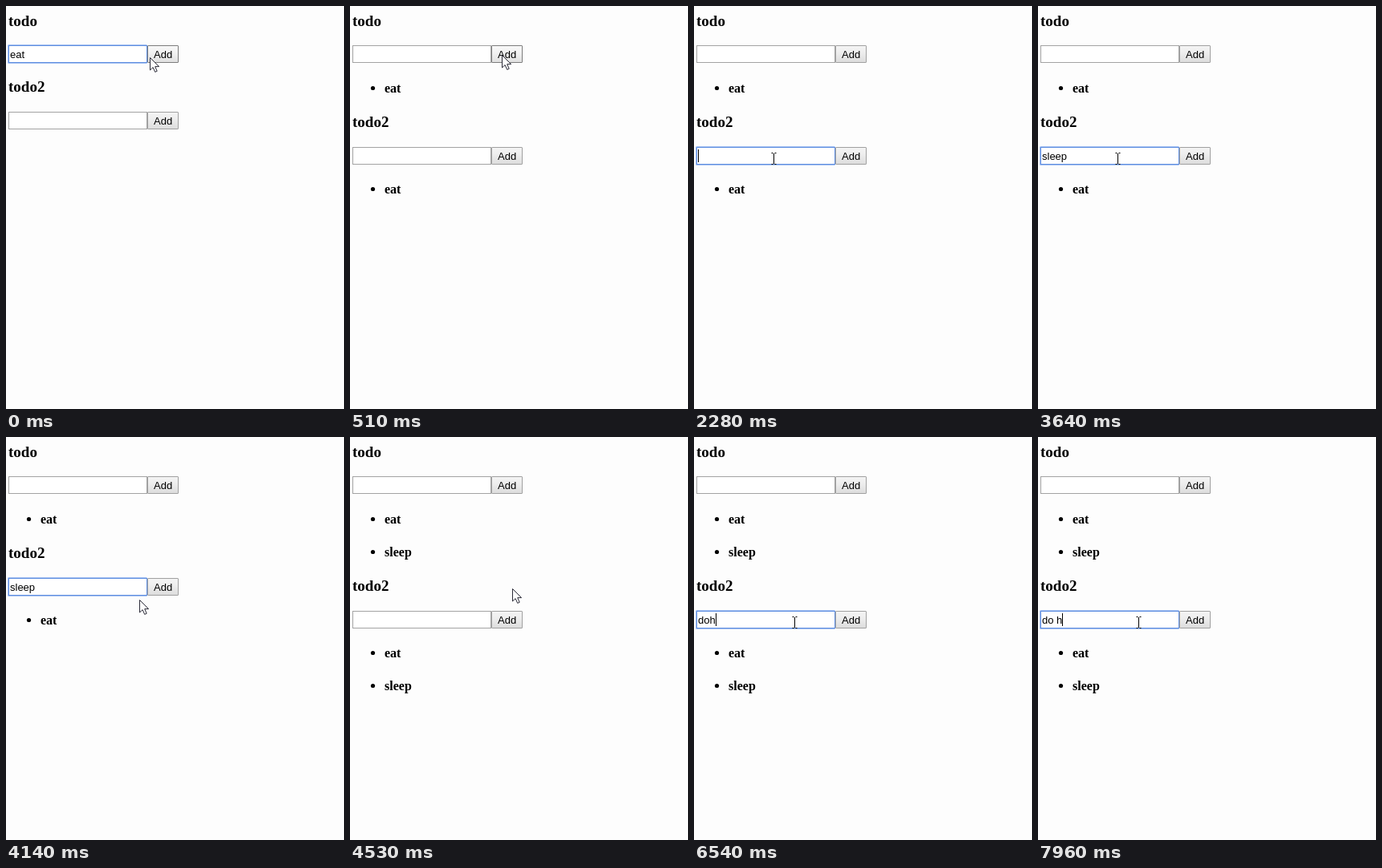
An HTML page for the animation above (8000 ms loop, 421 by 503 pixels).

```html
<!DOCTYPE html>
<html lang="en">
<head>
<meta charset="utf-8">
<title>Todo lists</title>
<style>
  html, body { margin: 0; width: 100%; height: 100%; overflow: hidden; background: #fdfdfd; }
  svg { display: block; width: 421px; height: 503px; }
  text { white-space: pre; }
  .head { font: bold 19px "Liberation Serif", serif; }
  .item { font: bold 16px "Liberation Serif", serif; }
  .ui { font: 13px "Liberation Sans", sans-serif; }
</style>
</head>
<body>
<svg id="stage" viewBox="0 0 421 503">
  <defs>
    <linearGradient id="idle" x2="0" y2="1">
      <stop offset="0" stop-color="#f4f4f4"/><stop offset=".4" stop-color="#eeeeee"/><stop offset="1" stop-color="#dcdcdc"/>
    </linearGradient>
    <linearGradient id="hover" x2="0" y2="1">
      <stop offset="0" stop-color="#f8f8f8"/><stop offset=".4" stop-color="#f2f2f2"/><stop offset="1" stop-color="#e0e0e0"/>
    </linearGradient>
    <linearGradient id="pressed" x2="0" y2="1">
      <stop offset="0" stop-color="#dddddd"/><stop offset="1" stop-color="#efefef"/>
    </linearGradient>
  </defs>
</svg>
<script>
const LOOP = 8000, ITEM_STEP = 41;
const stage = document.getElementById('stage');

function add(parent, tag, attrs, content = '') {
  const node = document.createElementNS('http://www.w3.org/2000/svg', tag);
  set(node, attrs);
  node.textContent = content;
  parent.appendChild(node);
  return node;
}
function set(node, attrs) {
  for (const key in attrs) node.setAttribute(key, attrs[key]);
}
const show = (node, on) => set(node, { visibility: on ? 'visible' : 'hidden' });
const move = (node, x, y) => set(node, { transform: `translate(${x} ${y})` });

// Each track holds [start time, value]; the latest started value applies.
const at = (track, t) => track.filter(step => step[0] <= t).pop()[1];

const itemCount = [[0, 0], [510, 1], [4530, 2]];
const focus = [[0, 0], [330, -1], [1180, 1], [4380, -1], [5680, 1]];
const mouseDown = [[0, false], [330, true], [510, false], [4380, true], [4530, false]];
const caretOn = [[0, false], [1180, true], [1720, false], [2280, true], [3640, false],
  [4180, true], [4380, false], [5680, true]];
const typed = [
  [[0, 'eat'], [510, '']],
  [[0, ''], [2400, 's'], [2590, 'sl'], [2770, 'sle'], [2960, 'slee'], [3080, 'sleep'], [4530, ''],
   [6110, 'd'], [6420, 'do'], [6540, 'doh'], [6920, 'do'], [7100, 'do '], [7280, 'do w'],
   [7710, 'do '], [7960, 'do h']]
];

// Pointer moves: start, end, number of steps, then start, control and end points.
const moves = [
  [45, 330, 3, [179, 64], [184, 63], [189, 61]],
  [570, 920, 6, [189, 61], [150, 120], [99, 190]],
  [3786, 4380, 8, [99, 190], [182, 216], [202, 189]],
  [4972, 5320, 6, [202, 189], [165, 205], [125, 234]],
  [5450, 5620, 3, [125, 234], [125, 232], [125, 231]]
];

function pointerAt(t) {
  let active = moves[0];
  for (const m of moves) if (t >= m[0]) active = m;
  const [start, end, steps, a, b, c] = active;
  const raw = Math.min(1, Math.max(0, (t - start) / (end - start)));
  const u = Math.floor(raw * steps + 1e-6) / steps;
  const k = u * u * (3 - 2 * u);
  return [0, 1].map(i =>
    Math.round((1 - k) ** 2 * a[i] + 2 * k * (1 - k) * b[i] + k * k * c[i]));
}

function makeList(title) {
  const heading = add(stage, 'text', { x: 3, class: 'head' }, title);
  const form = add(stage, 'g', {});
  const glow = add(form, 'rect', { x: 2, y: -1, width: 174, height: 24, rx: 1.5, fill: '#a6c1f2' });
  const box = add(form, 'rect', { x: 3.5, y: .5, width: 172, height: 21, fill: '#fff' });
  const value = add(form, 'text', { x: 5, y: 16, class: 'ui' });
  const caret = add(form, 'rect', { y: 3, width: 1, height: 16 });
  const button = add(form, 'rect', { x: 176.5, y: .5, width: 38, height: 21, rx: .5 });
  add(form, 'text', { x: 184, y: 16, class: 'ui' }, 'Add');
  const items = ['eat', 'sleep'].map(label => {
    const item = add(stage, 'g', {});
    add(item, 'circle', { cx: 28.5, cy: -5.5, r: 2.6 });
    add(item, 'text', { x: 43, class: 'item' }, label);
    return item;
  });
  return { heading, form, glow, box, value, caret, button, items };
}
const lists = ['todo', 'todo2'].map(makeList);

const arrow = add(stage, 'path', {
  d: 'M.5 .5V16L4.1 12.6L6.7 18.4L9.2 17.3L6.7 11.6H11.6Z',
  fill: '#fff', stroke: '#2b2b38', 'stroke-width': 1
});
const beam = add(stage, 'path', {
  d: 'M-2.5 -6.5H-.5M1.5 -6.5H3.5M.5 -6V7M-2.5 7.5H-.5M1.5 7.5H3.5',
  fill: 'none', stroke: '#000', 'stroke-width': 1
});

function render(t) {
  const count = at(itemCount, t);
  const [px, py] = pointerAt(t);
  let overField = false;

  lists.forEach((list, i) => {
    const shift = i * (count ? 85 + count * ITEM_STEP : 82);
    const top = 49 + shift + i;
    const inRow = py >= top && py < top + 22;
    const hovered = inRow && px >= 176 && px < 215;
    const focused = at(focus, t) === i;
    const text = at(typed[i], t);
    overField = overField || (inRow && px >= 3 && px < 176);

    set(list.heading, { y: 25 + shift });
    move(list.form, 0, top);
    show(list.glow, focused);
    set(list.box, { stroke: focused ? '#5e8ee0' : '#a3a3a3' });
    list.value.textContent = text;
    show(list.caret, focused && at(caretOn, t));
    set(list.caret, { x: Math.round(5 + (text ? list.value.getComputedTextLength() : 0)) });
    const look = hovered ? (at(mouseDown, t) ? 'pressed' : 'hover') : 'idle';
    set(list.button, { fill: `url(#${look})`, stroke: hovered ? '#7c7c7c' : '#a0a0a0' });
    list.items.forEach((item, n) => {
      show(item, n < count);
      move(item, 0, 108 + shift + n * ITEM_STEP);
    });
  });

  show(arrow, !overField);
  show(beam, overField);
  move(arrow, px, py);
  move(beam, px, py);
}

const begin = performance.now();
function frame() {
  render((performance.now() - begin) % LOOP);
  requestAnimationFrame(frame);
}
render(0);
requestAnimationFrame(frame);
</script>
</body>
</html>
```
